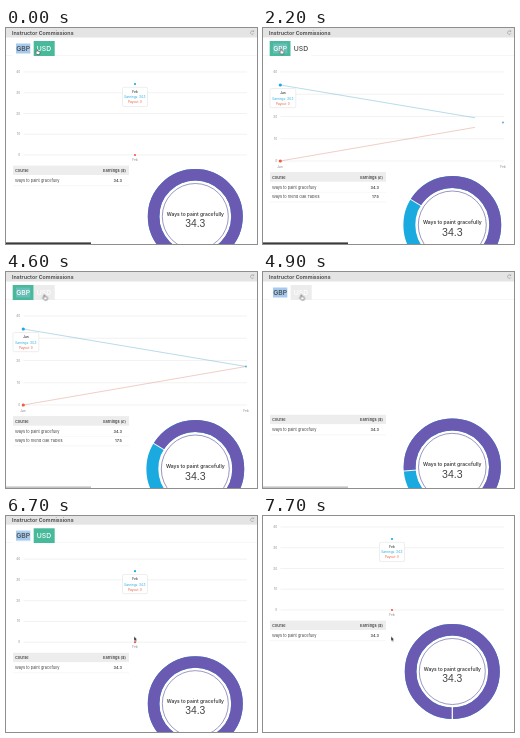
These frames come from a looping animation (251x216 px, 7.8 s). An HTML page:

```html
<!DOCTYPE html>
<html lang="en">
<head>
<meta charset="utf-8">
<title>Instructor Commissions</title>
<style>
/* --grow: page layout from short (0) to tall (1); --share: purple part of the ring */
@property --grow { syntax: "<number>"; inherits: true; initial-value: 0; }
@property --share { syntax: "<number>"; inherits: true; initial-value: 1; }

html, body { margin: 0; width: 100%; height: 100%; overflow: hidden; background: #fff; }
svg {
  display: block; width: 100vw; height: 100vh;
  font-family: Inter, "Open Sans", sans-serif;
  --teal: #48b99a; --pale: #ececec; --ink: #444; --blue: #1aaae0; --red: #f2593f; --purple: #6a5ab2;
  animation: grow 7.8s infinite, share 7.8s infinite;
}
text { dominant-baseline: central; fill: var(--ink); }
.mid { text-anchor: middle; }
.end { text-anchor: end; }
.bold { font-weight: 600; }

@keyframes grow {
  0%, 8.97% { --grow: 0; animation-timing-function: linear; }
  17.95% { --grow: .75; animation-timing-function: ease-out; }
  28%, 60.9% { --grow: 1; animation-timing-function: ease-out; }
  71.8% { --grow: .2; animation-timing-function: ease-out; }
  82%, 100% { --grow: 0; }
}
@keyframes share {
  0%, 9.62% { --share: 1; }
  17.3%, 60.9% { --share: .662; }
  70.5%, 100% { --share: 1; }
}

.page { animation: scroll 7.8s infinite; }
@keyframes scroll {
  0%, 84.62% { transform: translateY(0); animation-timing-function: ease-in-out; }
  96%, 100% { transform: translateY(-33px); }
}

/* hard switches */
.step { animation: 7.8s step-end infinite; }
.pounds { animation-name: pounds; }
.dollars { animation-name: dollars; }
.grid { animation-name: grid; }
.gbp-plot { animation-name: gbp-plot; }
.usd-plot { animation-name: usd-plot; }
.early { animation-name: early; }
.status { animation-name: status; }
.hand { animation-name: hand; }
.arrow { animation-name: arrow; }
.gbp-box { animation-name: gbp-box; }
.gbp-text { animation-name: gbp-text; }
.marked { animation-name: marked; }
.usd-box { animation-name: usd-box; }
.usd-text { animation-name: usd-text; }
@keyframes pounds { 0%, 60.9% { opacity: 0; } 9.62% { opacity: 1; } }
@keyframes dollars { 0%, 60.9% { opacity: 1; } 9.62% { opacity: 0; } }
@keyframes grid { 0%, 19.23%, 64.1% { opacity: 1; } 9.62%, 60.9% { opacity: 0; } }
@keyframes gbp-plot { 0%, 60.9% { opacity: 0; } 19.23% { opacity: 1; } }
@keyframes usd-plot { 0%, 64.1% { opacity: 1; } 9.62% { opacity: 0; } }
@keyframes early { 0%, 19.23% { opacity: 0; } 9.62% { opacity: 1; } }
@keyframes status {
  0% { opacity: 1; fill: #3a3a3a; }
  33.33%, 73.08% { opacity: 0; }
  51.28% { opacity: 1; fill: #c4c4c4; }
}
@keyframes hand { 0%, 50.64% { opacity: 1; } 30.77%, 65.38% { opacity: 0; } }
@keyframes arrow { 0%, 50.64% { opacity: 0; } 30.77%, 65.38% { opacity: 1; } }
@keyframes gbp-box { 0%, 60.26% { fill: #fff; } 5.13% { fill: var(--pale); } 23.08% { fill: var(--teal); } }
@keyframes gbp-text { 0%, 60.26% { fill: var(--ink); } 5.13% { fill: #fff; } }
@keyframes marked { 0%, 60.26% { opacity: 1; } 23.08% { opacity: .35; } }
@keyframes usd-box { 0%, 64.1% { fill: var(--teal); } 8.97% { fill: #fff; } 51.28% { fill: var(--pale); } }
@keyframes usd-text { 0%, 51.28% { fill: #fff; } 8.97% { fill: var(--ink); } }

.tabs text { font-size: 6.8px; font-weight: 500; }

.level { transform: translateY(calc((44 + var(--i) * (20.75 + 1.5 * var(--grow))) * 1px)); }
.level line { stroke: #e9e9e9; stroke-width: .6; }
.level text, .axis { font-size: 3.2px; fill: #888; }

.line { fill: none; stroke-width: .45; stroke-dasharray: 1 2; animation: draw 7.8s infinite; }
@keyframes draw {
  0%, 19.23% { stroke-dashoffset: 1; animation-timing-function: ease; }
  34.6%, 100% { stroke-dashoffset: 0; }
}

.tip rect { fill: #fff; stroke: #ddd; stroke-width: .5; }
.tip text { font-size: 3.1px; text-anchor: middle; }
.tip .earned { fill: var(--blue); }
.tip .paid { fill: var(--red); }

.table { transform: translateY(calc((142.3 + 6.7 * var(--grow)) * 1px)); }
.row { transform: translateY(calc((.8 + var(--i) * 9.5) * 1px)); font-size: 3.9px; }
.row line { stroke: #eee; stroke-width: .5; }
.head text { font-size: 3.9px; font-weight: 600; }

.donut { transform: translate(189.3px, calc((188.5 + 8.5 * var(--grow)) * 1px)) scale(calc(1 + .03 * var(--grow))); }
.ring circle { fill: none; stroke-width: 11.6; }
.part { stroke: var(--purple); stroke-dasharray: calc(var(--share) * 100px) 200px; }
.gap { stroke: #fff; stroke-width: .9; }
.turn { transform: rotate(calc(var(--share) * 360deg)); }
.sum { font: 10.3px "Liberation Sans", Arial, sans-serif; }

.cursor { animation: move 7.8s infinite ease-in-out; }
@keyframes move {
  0% { transform: translate(30px, 21px); }
  5.8%, 29.5% { transform: translate(17px, 20.5px); }
  38.5%, 43.6% { transform: translate(123px, 153.5px); }
  51.3%, 64.1% { transform: translate(37.5px, 22.5px); }
  70.5%, 74% { transform: translate(101.5px, 198.5px); }
  82%, 100% { transform: translate(128px, 120.3px); }
}
.arrow { fill: #222; stroke: #fff; stroke-width: .45; }
.hand { fill: #fff; stroke: #444; stroke-width: .6; }
</style>
</head>
<body>
<svg viewBox="0 0 251 216">
  <g class="page">
    <rect width="251" height="9.5" fill="#e4e4e4"/>
    <text class="bold" x="6" y="4.7" font-size="5.35">Instructor Commissions</text>
    <path d="M247.6 3.3A1.8 1.8 0 1 0 248 5.3M247.8 2.3V3.6H246.5" fill="none" stroke="#888" stroke-width=".5"/>

    <line x2="251" y1="27.6" y2="27.6" stroke="#eee" stroke-width=".6"/>
    <g class="tabs">
      <rect class="step gbp-box" x="6.7" y="13" width="21" height="15"/>
      <rect class="step marked" x="10" y="15.5" width="14.3" height="10" fill="#a6caee"/>
      <text class="mid step gbp-text" x="17.1" y="20.3">GBP</text>
      <rect class="step usd-box" x="27.7" y="13" width="21" height="15"/>
      <text class="mid step usd-text" x="38" y="20.3">USD</text>
    </g>

    <g class="step grid" id="grid"></g>

    <g class="step gbp-plot">
      <path class="line" pathLength="1" stroke="#5fb0d2" d="M17.3 57L240 94.5"/>
      <path class="line" pathLength="1" stroke="#df8f80" d="M17.3 133L240 94.5"/>
      <circle cx="17.3" cy="57" r="1.6" fill="#1aaae0"/>
      <circle cx="17.3" cy="133" r="1.6" fill="#f2593f"/>
      <circle cx="240" cy="94.5" r=".9" fill="#4ea9d2"/>
      <text class="axis mid" x="17" y="139">Jan</text>
      <text class="axis mid" x="240" y="139">Feb</text>
      <g class="tip" data-tip="7 60.5 25.8 Jan 34.3 0"></g>
    </g>

    <g class="step usd-plot">
      <circle cx="129" cy="56" r="1.1" fill="#1aaae0"/>
      <g class="level" style="--i:4">
        <circle cx="129" r="1.1" fill="#f2593f"/>
        <text class="axis mid" x="129" y="5.3">Feb</text>
      </g>
      <g class="tip" data-tip="116.5 59.3 25 Feb 34.3 0"></g>
    </g>

    <g class="step early"><g class="tip" data-tip="7 34 25.5 Feb 17.5 17.5"></g></g>

    <g class="table">
      <g class="head">
        <rect x="7" y="-4.9" width="116" height="9.6" fill="#ededed"/>
        <text x="9" y="0">Course</text>
        <text class="end step dollars" x="120" y="0">Earnings ($)</text>
        <text class="end step pounds" x="120" y="0">Earnings (£)</text>
      </g>
      <g class="row" style="--i:1">
        <text x="9" y="0">Ways to paint gracefully</text>
        <text class="end bold" x="116" y="0">34.3</text>
        <line x1="7" x2="123" y1="5" y2="5"/>
      </g>
      <g class="step pounds">
        <g class="row" style="--i:2">
          <text x="9" y="0">Ways to mend Oak Tables</text>
          <text class="end bold" x="116" y="0">17.5</text>
          <line x1="7" x2="123" y1="5" y2="5"/>
        </g>
      </g>
    </g>

    <g class="donut">
      <g class="ring" transform="rotate(90) scale(1 -1)">
        <circle r="41.7" stroke="#1aaae0"/>
        <circle class="part" r="41.7" pathLength="100"/>
        <line class="gap" x1="34" x2="48"/>
        <line class="gap turn" x1="34" x2="48"/>
      </g>
      <circle r="33" fill="#fff" stroke="#5d5299" stroke-width=".6"/>
      <text class="mid bold" y="-3" font-size="4.9">Ways to paint gracefully</text>
      <text class="mid sum" y="6.8">34.3</text>
    </g>
  </g>

  <rect class="step status" y="214.4" width="85" height="1.6"/>

  <g class="cursor">
    <path class="step arrow" d="M0 0V4.8L1.1 3.8L1.9 5.5L2.7 5.1L2 3.5H3.4Z"/>
    <path class="step hand" d="M.3 .5Q.8-.2 1.3 .5V2L3.6 2.6Q4.2 2.8 4 3.7L3.5 5.6H1L-.8 3.4Q-.6 2.6 .3 3.3Z"/>
  </g>
</svg>
<script>
const levels = [40, 30, 20, 10, 0];
document.getElementById("grid").innerHTML = levels.map((value, i) =>
  `<g class="level" style="--i:${i}"><line x1="17.5" x2="241"/><text class="end" x="14.3">${value}</text></g>`
).join("");

for (const tip of document.querySelectorAll(".tip")) {
  const [x, y, width, month, earned, paid] = tip.dataset.tip.split(" ");
  const mid = width / 2;
  tip.setAttribute("transform", `translate(${x} ${y})`);
  tip.innerHTML = `<rect width="${width}" height="19.2" rx="1.5"/>
    <text class="bold" x="${mid}" y="4.8">${month}</text>
    <text class="earned" x="${mid}" y="10.2">Earnings: ${earned}</text>
    <text class="paid" x="${mid}" y="15.2">Payout: ${paid}</text>`;
}
</script>
</body>
</html>
```
